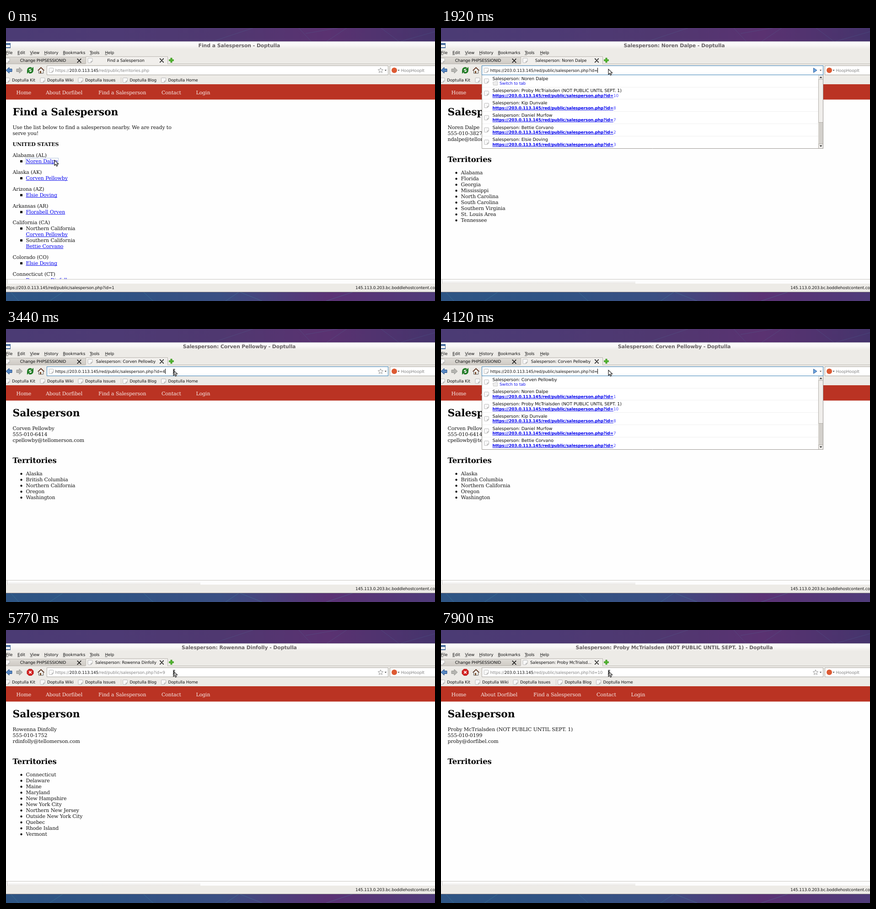
An HTML page with a canvas for the animation above (8000 ms loop, 938x597 px).

```html
<!DOCTYPE html>
<html lang="en">
<head>
<meta charset="utf-8">
<title>Browser session</title>
<style>
html, body { margin: 0; width: 100%; height: 100%; overflow: hidden; }
canvas { display: block; }
</style>
</head>
<body>
<canvas id="stage" width="938" height="597"></canvas>
<script>
const ctx = document.getElementById('stage').getContext('2d');
const LOOP = 8000;
const SANS = '8.89px "DejaVu Sans", sans-serif';
const SANS_BOLD = 'bold ' + SANS;
const ROW = '9.58px "DejaVu Sans", sans-serif';
const TITLE = 'bold 10.94px "DejaVu Sans", sans-serif';
const SERIF = '10.94px "DejaVu Serif", serif';
const SERIF_BOLD = 'bold ' + SERIF;
const H1 = 'bold 21.9px "DejaVu Serif", serif';
const H2 = 'bold 16.4px "DejaVu Serif", serif';
const LINK = '#0000ee', CHROME = '#edebe7', GREY = '#858585';
const APP = 'Doptulla', HOST = '203.0.113.145', BASE = '/red/public/';
const PERSON = BASE + 'salesperson.php?id=';

const people = {
  1: 'Noren Dalpe', 2: 'Bettie Corvano', 3: 'Elsie Doving', 4: 'Corven Pellowby',
  7: 'Daniel Murfow', 8: 'Kip Dunvale', 9: 'Rowenna Dinfolly',
  10: 'Proby McTrialsden (NOT PUBLIC UNTIL SEPT. 1)'
};
const pages = [
  null,
  { id: 1, phone: '555-010-3827', mail: 'ndalpe@tellomerson.com',
    places: 'Alabama,Florida,Georgia,Mississippi,North Carolina,South Carolina,Southern Virginia,St. Louis Area,Tennessee' },
  { id: 4, phone: '555-010-6414', mail: 'cpellowby@tellomerson.com',
    places: 'Alaska,British Columbia,Northern California,Oregon,Washington' },
  { id: 9, phone: '555-010-1752', mail: 'rdinfolly@tellomerson.com',
    places: 'Connecticut,Delaware,Maine,Maryland,New Hampshire,New York City,Northern New Jersey,Outside New York City,Quebec,Rhode Island,Vermont' },
  { id: 10, phone: '555-010-0199', mail: 'proby@dorfibel.com', places: '' }
];
const territories = [
  ['Alabama (AL)', [['', 1]]], ['Alaska (AK)', [['', 4]]], ['Arizona (AZ)', [['', 3]]],
  ['Arkansas (AR)', [['', 'Florabell Orven']]],
  ['California (CA)', [['Northern California', 4], ['Southern California', 2]]],
  ['Colorado (CO)', [['', 3]]], ['Connecticut (CT)', [['', 9]]]
];

// start time, page, id in the address bar, mode
const steps = [
  [0, 0, '', 'idle'], [150, 1, '1', 'load'], [290, 1, '1', 'idle'],
  [920, 1, '1', 'focus'], [1480, 1, '1', 'blink'], [1920, 1, '', 'open'], [2200, 1, '4', 'typed'],
  [2600, 2, '4', 'load'], [2730, 2, '4', 'idle'], [3440, 2, '4', 'focus'],
  [3990, 2, '', 'open'], [4960, 2, '9', 'typed'],
  [5770, 3, '9', 'load'], [5910, 3, '9', 'idle'], [6470, 3, '9', 'focus'],
  [7030, 3, '', 'open'], [7340, 3, '1', 'typed'], [7470, 3, '10', 'typed'],
  [7900, 4, '10', 'load']
];

function rect(x, y, w, h, fill) {
  ctx.fillStyle = fill;
  ctx.fillRect(x, y, w, h);
}
function frame(x, y, w, h, color, width = 1) {
  ctx.strokeStyle = color;
  ctx.lineWidth = width;
  ctx.strokeRect(x, y, w, h);
}
function gradient(x0, y0, x1, y1, ...colors) {
  const g = ctx.createLinearGradient(x0, y0, x1, y1);
  colors.forEach((c, i) => g.addColorStop(i / (colors.length - 1), c));
  return g;
}
// Draws text and returns the x where it ends.
function text(str, x, y, font = SANS, color = '#111', align = 'left') {
  ctx.font = font;
  ctx.fillStyle = color;
  ctx.textAlign = align;
  ctx.fillText(str, x, y);
  return x + ctx.measureText(str).width;
}
function link(str, x, y, font = SERIF) {
  const end = text(str, x, y, font, LINK);
  rect(x, Math.round(y) + 1, end - x, 0.9, LINK);
  return end;
}
function shape(d, x, y, fill, stroke, width = 1) {
  const path = new Path2D(d);
  ctx.save();
  ctx.translate(x, y);
  if (fill) { ctx.fillStyle = fill; ctx.fill(path); }
  if (stroke) { ctx.strokeStyle = stroke; ctx.lineWidth = width; ctx.stroke(path); }
  ctx.restore();
}
function dot(x, y, r, fill) {
  shape(`M${-r} 0a${r} ${r} 0 1 0 ${2 * r} 0a${r} ${r} 0 1 0 ${-2 * r} 0`, x, y, fill);
}
function pageIcon(x, y) {
  shape('M-4 -5H3.5Q5 -5 5 -3.5V1.5L1.5 5H-3.5Q-5 5 -5 3.5V-4Z', x, y, '#f8f8f8', '#aaa', 0.8);
  shape('M1.5 5V2.5Q1.5 1.5 2.5 1.5H5Z', x, y, '#c8c8c8', '#999', 0.5);
}
function closeIcon(x, y) {
  shape('M-3.5 -3.5L3.5 3.5M3.5 -3.5L-3.5 3.5M-4.5 -3.8H-2.5M2.5 -3.8H4.5M-4.5 3.8H-2.5M2.5 3.8H4.5', x, y, null, '#111', 1.5);
}
const caretDown = (x, y) => shape('M-2.2 -1H2.2L0 1.5Z', x, y, '#444');

function drawDesktop() {
  rect(0, 0, 938, 30, gradient(0, 0, 938, 0, '#4b3b74', '#4d3a74', '#4f3870', '#5a3271', '#45346c'));
  rect(0, 576, 938, 21, gradient(0, 0, 938, 0, '#2e5584', '#2f5384', '#3a4f83', '#5b3275', '#4f3b79'));
  shape('M450 30L540 0M640 0L668 30M655 12L725 0M700 30L745 0M820 0L860 30L938 8', 0, 0, null, '#5078a040', 1);
  shape('M10 577L28 597M95 597L125 577M300 577L322 597M480 597L510 577L560 597M700 597L760 577', 0, 0, null, '#40a0b050', 1);
}

function drawToolbar(loading) {
  shape('M-7 0L0 -6.5V-3H6V3H0V6.5Z', 7, 92.5, '#5687c2', '#204a87', 1);
  shape('M7 0L0 -6.5V-3H-6V3H0V6.5Z', 29, 92.5, '#b5b5b1', '#969692', 1);
  if (loading) {
    shape('M-3 -7H3L7 -3V3L3 7H-3L-7 3V-3Z', 53, 92.5, '#d32222', '#a40000', 0.8);
    shape('M-2.7 -2.7L2.7 2.7M2.7 -2.7L-2.7 2.7', 53, 92.5, null, '#fff', 1.9);
  } else {
    shape('M-5 0.5A5 5 0 0 1 3 -4.2M5 -0.5A5 5 0 0 1 -3 4.2', 53, 92.5, null, '#1f7a24', 3.4);
    shape('M7 -7.5V0H-0.5ZM-7 7.5V0H0.5Z', 53, 92.5, '#1f7a24');
  }
  shape('M-5 0V6.5H5V0L0 -5Z', 76.5, 92.5, '#f2f0ec', '#555', 1);
  shape('M-7 0.5L0 -6L7 0.5', 76.5, 92.5, null, '#6b3a26', 1.7);
  rect(74, 94, 3, 5, '#7b5131');
}

function drawAddress(page, id, mode) {
  const active = !['idle', 'load'].includes(mode);
  rect(89, 82, 747, 21, '#fff');
  frame(89.5, 82.5, 746, 20, active ? '#387fb5' : '#aaa6a0');
  pageIcon(99, 92.5);
  const path = page ? PERSON + id : BASE + 'territories.php';
  if (active) {
    const end = text('https://' + HOST + path, 107.5, 95.5);
    if (mode !== 'blink') rect(Math.round(end), 87, 1, 11, '#000');
  } else {
    const hostX = text('https://', 107.5, 95.5, SANS, GREY);
    text(path, text(HOST, hostX, 95.5), 95.5, SANS, GREY);
  }
  if (mode === 'open' || mode === 'typed') {
    shape('M-3.5 -5L4 0L-3.5 5Z', 818, 92.5, '#6fa3dc', '#2a62a5', 1);
  } else {
    shape('M0 -5.5L1.6 -1.8L5.5 -1.5L2.5 1.2L3.4 5L0 3L-3.4 5L-2.5 1.2L-5.5 -1.5L-1.6 -1.8Z', 819, 92.5, '#fff', '#888', 0.9);
  }
  caretDown(830, 92.5);
}

function drawChrome(page, id, mode) {
  const heading = page ? 'Salesperson: ' + people[pages[page].id] : 'Find a Salesperson';
  rect(0, 29, 938, 549, CHROME);
  rect(0, 29, 938, 17, gradient(0, 29, 0, 46, '#ffffff', '#f8f7f6', CHROME));
  rect(0, 29, 938, 1, '#b4afbe');
  rect(0, 33, 10, 11, '#456a9c');
  rect(0, 37, 9, 5, '#f4f4f4');
  text(heading + ' - ' + APP, 510, 42, TITLE, '#666163', 'center');
  [['File', 0], ['Edit', 25], ['View', 52.5], ['History', 83.5], ['Bookmarks', 124.5], ['Tools', 183], ['Help', 216.5]]
    .forEach(([label, x]) => {
      text(label, x, 57);
      rect(x, 58, 5, 0.8, '#333');
    });

  rect(0, 64, 174, 14, gradient(0, 64, 0, 78, '#dedbd6', '#cfcbc5'));
  rect(0, 78, 938, 1, '#bbb7b1');
  rect(174, 62, 179, 17, '#f1efec');
  shape('M0 63.5H174M174.5 78V62.5H353.5V78', 0, 0, null, '#bbb7b1');
  pageIcon(3, 71);
  pageIcon(184, 71);
  text('Change PHPSESSIONID', 81, 74.2, SANS, '#111', 'center');
  const tab = heading.length > 34 ? heading.slice(0, 28) + '...' : heading;
  text(tab, 262, 74, SANS, '#111', 'center');
  closeIcon(160, 71.5);
  closeIcon(340.5, 71);
  shape('M-1.6 -5H1.6V-1.6H5V1.6H1.6V5H-1.6V1.6H-5V-1.6H-1.6Z', 361.5, 70.5, '#4fb32f', '#37911b', 0.7);

  drawToolbar(mode === 'load');
  drawAddress(page, id, mode);
  rect(839, 82, 99, 21, '#fff');
  frame(839.5, 82.5, 110, 20, '#aaa6a0');
  dot(849, 92.5, 6, '#dd5a33');
  caretDown(858.5, 92.5);
  text('HoopHoopIt', 863.5, 95.5, SANS, GREY);

  [['Kit', 13], ['Wiki', 90], ['Issues', 173], ['Blog', 270.5], ['Home', 354.5]].forEach(([label, x]) => {
    pageIcon(x - 10, 114);
    text(APP + ' ' + label, x, 117.3);
  });
  rect(251, 108, 1, 12, '#d0ccc6');

  rect(0, 549, 938, 10, '#fdfdfd');
  rect(0, 549, 938, 1, '#c8c6c2');
  rect(2, 550, 1, 9, '#c8c6c2');
  if (page) rect(3, 553, 422, 6, gradient(0, 553, 0, 559, '#fbfbfb', '#e9e7e4'));
  rect(0, 577, 938, 1, '#77727c');
  text('145.113.0.203.bc.boddlehostcontent.com', 764, 571.2);
}

function drawTerritories() {
  text('Find a Salesperson', 14.5, 191, H1, '#000');
  text('Use the list below to find a salesperson nearby. We are ready to', 14.5, 221, SERIF, '#111');
  text('serve you!', 14.5, 234, SERIF, '#111');
  text('UNITED STATES', 14.5, 258, SERIF_BOLD, '#111');
  let y = 282;
  for (const [state, areas] of territories) {
    text(state, 14.5, y, SERIF);
    for (const [area, who] of areas) {
      y += 13;
      rect(31, Math.round(y) - 6, 5, 5, '#111');
      if (area) {
        text(area, 43.5, y, SERIF);
        y += 13;
      }
      link(people[who] || who, 43.5, y);
    }
    y += 23.85;
  }
  ctx.setLineDash([1, 1]);
  frame(42.5, 284.5, 72, 14, '#6a8fc0');
  ctx.setLineDash([]);
}

function drawPerson({ id, phone, mail, places }) {
  text('Salesperson', 14.5, 191, H1, '#000');
  [people[id], phone, mail].forEach((line, i) => text(line, 14.5, 221 + 13 * i, SERIF));
  text('Territories', 14.5, 292.6, H2, '#000');
  if (!places) return;
  places.split(',').forEach((place, i) => {
    dot(33.5, 316.7 + 13 * i, 2.2, '#111');
    text(place, 43.5, 320 + 13 * i, SERIF);
  });
}

function drawContent(page) {
  ctx.save();
  ctx.beginPath();
  ctx.rect(0, 123, 938, 426);
  ctx.clip();
  rect(0, 123, 938, 426, '#fefefe');
  rect(0, 123, 938, 33.5, '#ba3323');
  [['Home', 22.5], ['About Dorfibel', 87], ['Find a Salesperson', 202], ['Contact', 340], ['Login', 415.5]]
    .forEach(([label, x]) => text(label, x, 144.5, SERIF, '#f8eeec'));
  if (page) drawPerson(pages[page]);
  else drawTerritories();
  ctx.restore();
}

function drawPopup(page) {
  const visited = pages.slice(1, page + 1).map(p => p.id).reverse();
  const ids = [...visited, 10, 8, 7, 2, 3].slice(0, 6);
  rect(89, 103, 747, 161, '#fff');
  ids.forEach((id, i) => {
    const y = 26.75 * i;
    pageIcon(99.5, 116 + y);
    text('Salesperson: ' + people[id], 112.5, 113.5 + y, ROW);
    if (i) {
      const end = link('https://' + HOST + PERSON, 112.5, 124.2 + y, SANS_BOLD);
      text(id, end, 124.2 + y, SANS, '#4a4aff');
    } else {
      shape('M-5 -3H-1L0 -4H5V4H-4Z', 118.5, 121, '#eee', '#bbb', 0.8);
      text('Switch to tab', 128, 124.3, SANS, '#1515f0');
    }
    if (i < 5) rect(90, Math.round(128.5 + y), 735, 1, '#efefef');
  });
  rect(825, 103, 11, 160, '#d3d0cb');
  rect(826, 103, 9, 103, '#f0eeeb');
  rect(826, 253, 9, 10, '#f0eeeb');
  frame(825.5, 112.5, 10, 94, '#b2aea8');
  frame(825.5, 253.5, 10, 10, '#b2aea8');
  shape('M-3 1.5H3L0 -2Z', 830.5, 108, '#333');
  shape('M-3 -1.5H3L0 2Z', 830.5, 258, '#333');
  shape('M89.5 103V263.5H835.5V103', 0, 0, null, '#9b9893');
}

function drawPointer(t, mode) {
  const hops = t < 290 ? 0 : Math.min(5, 1 + Math.floor((t - 290) / 122.5));
  const p = hops / 5, k = p * p * (3 - 2 * p);
  const x = 106 + 260 * k, y = 289 - 199 * k;
  shape('M0 0V11.5L2.7 9L4.6 13.3L6.8 12.3L4.9 8.2H8.6Z', x, y, '#fff', '#111', 1.1);
  if (hops === 5 && mode !== 'open') {
    shape('M-2.5 -4.5H2.5M0 -4.5V4M-2.5 4H2.5', x + 1.5, y + 2.5, null, '#111', 1.2);
  }
}

function draw(now) {
  const t = now % LOOP;
  const [, page, id, mode] = steps.findLast(s => s[0] <= t);
  ctx.letterSpacing = '-0.1px';
  ctx.textRendering = 'geometricPrecision';
  drawDesktop();
  drawChrome(page, id, mode);
  drawContent(page);
  if (t < 290) text('https://' + HOST + PERSON + '1', -3.5, 570.5);
  if (mode === 'open') drawPopup(page);
  drawPointer(t, mode);
  requestAnimationFrame(draw);
}
requestAnimationFrame(draw);
</script>
</body>
</html>
```
